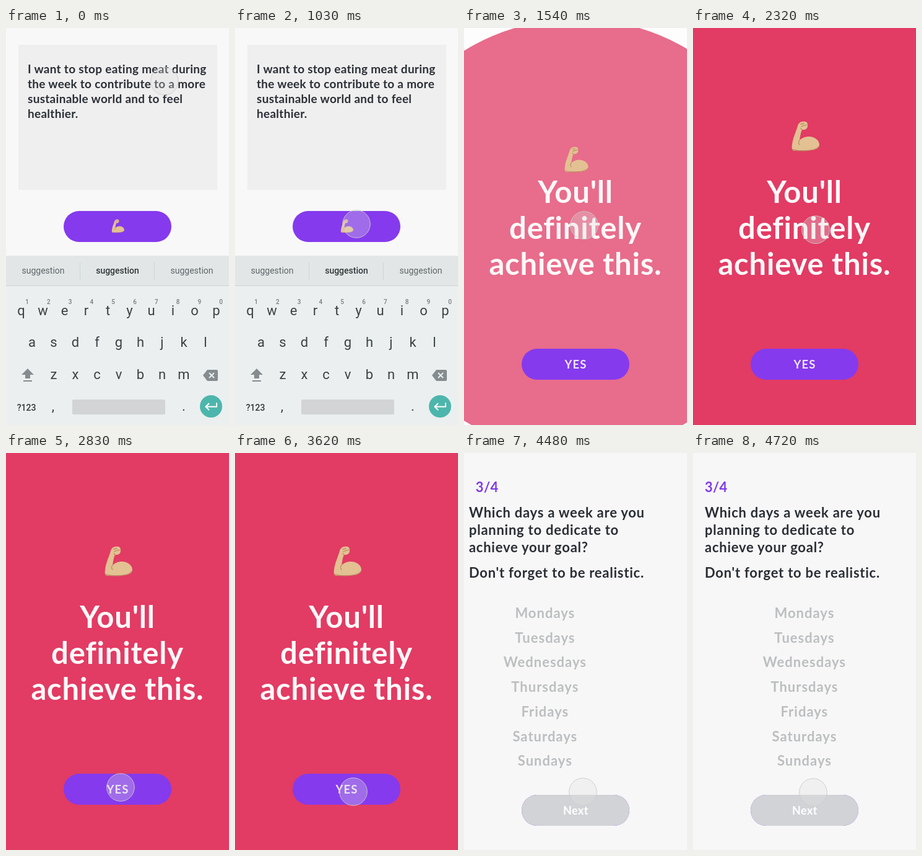
These frames come from a looping animation (360 by 640 pixels, 5.02 s). An HTML page:

```html
<!DOCTYPE html>
<html lang="en">
<head>
<meta charset="utf-8">
<title>Goal setup</title>
<style>
  html, body { margin: 0; width: 100%; height: 100%; overflow: hidden; background: #f8f8f8; }
  svg { display: block; width: 100%; height: 100%; }
  text { font-family: Lato, "Open Sans", sans-serif; font-weight: 700; }
  .middle text { text-anchor: middle; }
  #goal text { font-size: 19px; letter-spacing: .28px; fill: #2b2f36; }
  #headline text { font-size: 49px; letter-spacing: .8px; fill: #fdf8f8; }
  #step, #question text { font-size: 22px; letter-spacing: .75px; fill: #2a2e35; }
  #step { fill: #7f39ea; letter-spacing: .3px; }
  #days text { font-size: 22px; letter-spacing: 1px; fill: #bcbec0; }
  #button text { font-size: 18.5px; letter-spacing: 1px; fill: #fff; }
  #button #next { font-size: 18px; letter-spacing: .5px; }
  #keyboard text { font-family: Roboto, sans-serif; font-weight: 400; font-size: 22px; fill: #3b4245; }
  #keyboard .hint { font-size: 14px; fill: #5f6669; }
  #keyboard .strong { font-weight: 500; fill: #30373a; }
  #keyboard .digit { font-size: 10px; font-weight: 500; fill: #777d80; }
</style>
</head>
<body>
<svg viewBox="0 0 360 640">
  <rect id="page" width="360" height="640"/>

  <g id="editor">
    <rect x="20" y="27" width="321" height="234" fill="#efefef"/>
    <g id="goal"></g>
    <g id="keyboard" class="middle">
      <rect y="367" width="360" height="273" fill="#ebeff0"/>
      <rect y="367" width="360" height="49" fill="#e2e6e6"/>
      <path d="M0 415.5H360M119.5 378V406M239.5 378V406" stroke="#cfd4d5"/>
      <rect x="107" y="599" width="150" height="24" rx="2" fill="#d2d4d5"/>
      <g fill="#858c8f">
        <path d="M35 549L45 559H39V565H31V559H25ZM28 568H42V570H28Z"/>
        <path d="M325 551H340Q342 551 342 553V567Q342 569 340 569H325L318 560Z"/>
      </g>
      <path d="M328 556L336 564M336 556L328 564" stroke="#ebeff0" stroke-width="2"/>
      <circle cx="331" cy="610" r="18" fill="#4db6ac"/>
      <path d="M340 604V610.5H323M328 605L322.500 610.500L328 616" fill="none" stroke="#fff" stroke-width="2"/>
    </g>
  </g>

  <circle id="wave" cx="182.500" fill="#e23b64"/>
  <g id="headline" class="middle"></g>

  <text id="step" x="19" y="62.500">3/4</text>
  <g id="question"></g>
  <g id="days" class="middle"></g>

  <g id="button" class="middle">
    <rect x="93" y="-25" width="174" height="50" rx="25" fill="#853aee"/>
    <rect id="disabled" x="93" y="-25" width="174" height="50" rx="25" fill="#d1d3d7"/>
    <text id="yes" x="180.500" y="7">YES</text>
    <text id="next" x="180.500" y="7">Next</text>
  </g>

  <g id="arm">
    <path fill="#e3c193" d="M-13-16C-12-21-7-24-3-23C1-24 4-20 3-16C3-12-1-9-6-10C-8-6-9 0-10 7C-6 3 0 1 5 1C14 1 22 7 22 14C22 20 15 23 7 23L-18 24C-22 24-23 20-22 14C-21 4-16-6-13-16Z"/>
    <path fill="none" stroke="#b98c60" stroke-width="1.300" stroke-linecap="round" d="M-7-15C-4-18-1-16 2-18M-8-19L-3-20M-6-10L-8-12M-10 7C-12 9-12 12-10 14M-21 22C-10 25 16 25 21 17"/>
  </g>
  <circle id="cursor" r="22.300" fill="rgba(220,220,220,.3)" stroke="rgba(203,203,203,.9)"/>
</svg>

<script>
const LOOP = 5020;
const $ = id => document.getElementById(id);

function addText(parent, string, x, y, className = "") {
  const node = document.createElementNS("http://www.w3.org/2000/svg", "text");
  node.setAttribute("x", x);
  node.setAttribute("y", y);
  node.setAttribute("class", className);
  node.textContent = string;
  $(parent).append(node);
}
const addLines = (parent, lines, x, y, step) =>
  lines.forEach((line, i) => addText(parent, line, x, y + i * step));

addLines("goal", ["I want to stop eating meat during", "the week to contribute to a more",
  "sustainable world and to feel", "healthier."], 35, 73, 24);
addLines("headline", ["You'll", "definitely", "achieve this."], 180, 281.5, 58);
addLines("question", ["Which days a week are you", "planning to dedicate to",
  "achieve your goal?"], 19, 103.5, 28);
addText("question", "Don't forget to be realistic.", 19, 201);
addLines("days", ["Mondays", "Tuesdays", "Wednesdays", "Thursdays", "Fridays",
  "Saturdays", "Sundays"], 180.5, 266, 39.7);

[60, 180, 300].forEach(x => addText("keyboard", "suggestion", x, 396, x === 180 ? "hint strong" : "hint"));
[["qwertyuiop", 24.5, 463], ["asdfghjkl", 42, 514], ["zxcvbnm", 77, 566]].forEach(([keys, x, y]) =>
  [...keys].forEach((key, i) => addText("keyboard", key, x + 35 * i, y)));
[..."1234567890"].forEach((digit, i) => addText("keyboard", digit, 34 + 34.8 * i, 445, "digit"));
addText("keyboard", "?123", 33, 617, "hint strong");
addText("keyboard", ",", 76, 617);
addText("keyboard", ".", 287, 617);

const clamp = u => Math.min(1, Math.max(0, u));
const easeOut = u => 1 - (1 - u) ** 3;
const easeInOut = power => u =>
  u < .5 ? (2 * u) ** power / 2 : 1 - (2 - 2 * u) ** power / 2;
const smooth = easeInOut(2);

// Each move is [start, end, value, easing]; moves are applied in order.
const track = (t, from, ...moves) => moves.reduce((value, [start, end, to, ease = easeOut]) =>
  value + (to - value) * ease(clamp((t - start) / (end - start))), from);

const place = (id, x, y, scale = 1) =>
  $(id).setAttribute("transform", `translate(${x} ${y}) scale(${scale})`);
const fade = (id, opacity) => $(id).setAttribute("opacity", opacity);

function draw(t) {
  const reveal = track(t, 0, [1200, 1770, 1, easeInOut(3)]);
  const leave = track(t, 0, [3920, 4200, 1]);

  $("page").setAttribute("fill", t < 1200 ? "#f8f8f8" : t < 3920 ? "#fdfdfd" : "#f7f7f7");
  fade("editor", track(t, 1, [1100, 1400, 0]));
  $("wave").setAttribute("cy", 320 + 20 * reveal);
  $("wave").setAttribute("r", 472 * reveal);
  fade("wave", reveal * (1 - leave));
  fade("headline", track(t, 0, [1220, 1480, 1]) * (1 - leave));

  place("arm", 181 + reveal, 319 - 145 * reveal, .455 + .545 * reveal);
  fade("arm", 1 - leave);

  place("button", 0, track(t, 320, [1100, 1480, 542], [3920, 4200, 576]));
  fade("disabled", leave);
  fade("yes", .88 * track(t, 0, [1220, 1480, 1]) * (1 - leave));
  fade("next", leave);

  ["step", "question", "days"].forEach((id, i) => {
    const start = [3926, 4069, 4191][i];
    place(id, track(t, -360, [start, start + 600, 0]), 0);
  });

  place("cursor",
    track(t, 256, [0, 1030, 196], [1100, 1500, 194], [2070, 2320, 198, smooth],
      [2320, 2650, 182, smooth], [2650, 3070, 190, smooth], [3220, 3620, 191], [4450, 4720, 194]),
    track(t, 85, [0, 1030, 316], [1100, 1500, 318], [2070, 3070, 545, easeInOut(4)],
      [3220, 3620, 546], [4450, 4720, 547]));
}

const began = performance.now();
function tick() {
  draw((performance.now() - began) % LOOP);
  requestAnimationFrame(tick);
}
tick();
</script>
</body>
</html>
```
